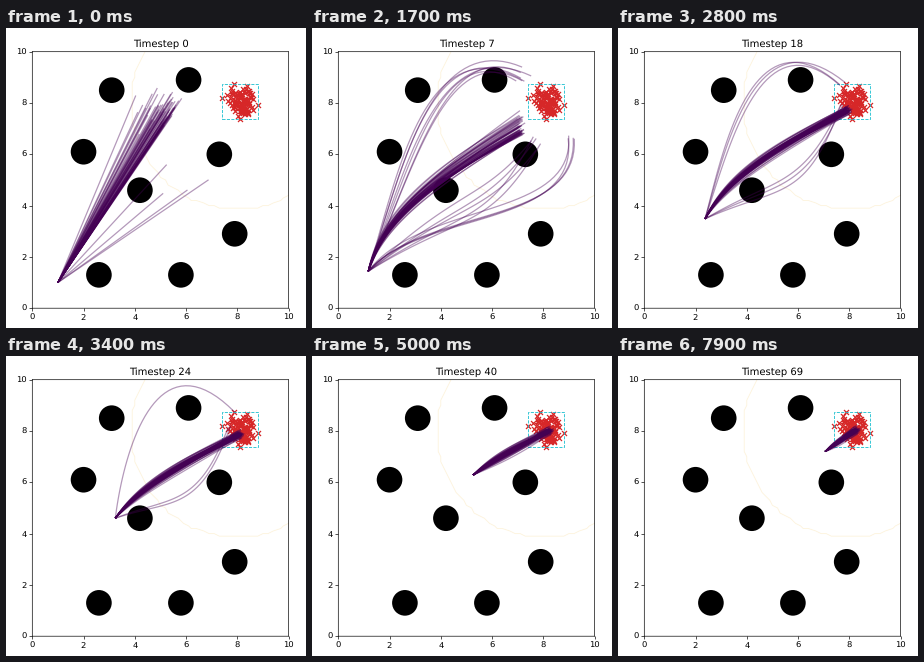
These frames come from a looping animation (300 px wide and 300 px high, 8000 ms). A matplotlib script:

```python
import matplotlib.pyplot as plt
import numpy as np
from matplotlib.animation import FuncAnimation
from matplotlib.collections import LineCollection
from matplotlib.patches import Circle, Rectangle

plt.rcParams["text.hinting"] = "none"

FRAMES, INTERVAL, HOLD = 80, 100, 10
GOAL = 8 + 8j
OBSTACLES = [(3.1, 8.5), (6.1, 8.9), (2.0, 6.1), (7.3, 6.0),
             (4.2, 4.6), (7.9, 2.9), (2.6, 1.3), (5.8, 1.3)]
rng = np.random.default_rng(11)

# Positions are complex numbers x + yj.
STEPS = np.array([0, 7, 13, 24, 40, 51, 69])
ROBOT = np.array([1 + 1j, 1.17 + 1.44j, 1.72 + 2.5j, 3.24 + 4.6j,
                  5.26 + 6.28j, 6.2 + 6.78j, 7.06 + 7.2j])
SPEED = np.gradient(ROBOT, STEPS)

# Detours: two control points, final end, lag of the end at the start.
OVER = (3 + 5.9j, 4.2 + 11.2j, 7.8 + 8.6j, .6 - .3j)
BETWEEN = (5 + 4.6j, 6 + 4j, 7.7 + 8.5j, 0 + 1.9j)
UNDER = (3.5 + 4.2j, 9.8 + 3.4j, 9.6 + 7.2j, .4 + .4j)
DIRECT_END, DIRECT_LAG = 8.3 + 8.05j, 1.1 + 1.25j

S = np.linspace(0, 1, 40)
ARCH = np.sin(np.pi * S)


def robot_at(t):
    """Cubic Hermite passage through the robot's key positions."""
    i = min(np.searchsorted(STEPS, t, side="right") - 1, len(STEPS) - 2)
    h = STEPS[i + 1] - STEPS[i]
    u = (t - STEPS[i]) / h
    return ((1 + 2 * u) * (1 - u) ** 2 * ROBOT[i]
            + u * (1 - u) ** 2 * h * SPEED[i]
            + u * u * (3 - 2 * u) * ROBOT[i + 1]
            + u * u * (u - 1) * h * SPEED[i + 1])


def bezier(a, b, c, d):
    return ((1 - S) ** 3 * a + 3 * S * (1 - S) ** 2 * b
            + 3 * S * S * (1 - S) * c + S ** 3 * d)


class Plan:
    def __init__(self, route, life, angle, fan, length):
        self.route, self.life = route, life
        self.ray = length * np.exp(1j * (angle + fan * rng.exponential()))
        self.end = complex(*rng.normal(size=2))
        self.bow = rng.normal()
        self.lift = rng.exponential()

    def curve(self, t):
        start = robot_at(t)
        settle = min(1, np.exp((7 - t) / 9))
        fresh = np.exp(-t / 7)
        if self.route and t <= self.life:
            b, c, end, lag = self.route
            shift = .35 * (start - ROBOT[2])
            b, c = b + shift, c + shift
            wide = .08 + .35 * fresh
            end += wide * self.end - lag * settle
        else:
            wide = .07
            end = DIRECT_END - DIRECT_LAG * settle
            end += wide * self.end + .5j * fresh * self.lift
            chord = end - start
            bend = 1 / (1 + (t / 24) ** 3)
            b = start + chord * (.25 + .16j * bend)
            c = start + chord * (.6 + .09j * bend)
        chord = end - start
        bow = wide * self.bow * min(1, abs(chord) / 3)
        bent = bezier(start, b, c, end) + 1j * chord / abs(chord) * bow * ARCH
        straight = np.exp(-t / 2)  # the first plans are plain rays
        return straight * (start + self.ray * S) + (1 - straight) * bent


def group(route, count, lives, angle, fan, lengths):
    return [Plan(route, life, angle, fan, rng.uniform(*lengths))
            for life in np.linspace(*lives, count)]


PLANS = (group(None, 52, (99, 99), .97, .05, (7.3, 8.7))
         + group(OVER, 7, (9, 25), 1.03, .06, (6.5, 8.7))
         + group(BETWEEN, 5, (10, 36), .97, .04, (7.5, 8.5))
         + group(UNDER, 4, (10, 17), .58, .08, (3.5, 7.4)))

fig = plt.figure(figsize=(5, 5), dpi=60)
ax = fig.add_axes([26.3 / 300, 19.8 / 300, 256.2 / 300, 256.5 / 300])
ax.set(xlim=(0, 10), ylim=(0, 10), xticks=range(0, 11, 2),
       yticks=range(0, 11, 2))
for spine in ax.spines.values():
    spine.set_snap(False)
title = ax.set_title("Timestep 0")

ring = GOAL + 4.15 * np.exp(1j * np.linspace(0, 2 * np.pi, 120))
ax.plot(ring.real.round(1), ring.imag.round(1), color="#fdf3dc", lw=1, zorder=1)
for spot in OBSTACLES:
    ax.add_patch(Circle(spot, .5, color="black", lw=0, zorder=2))

# Samples of the goal, scaled to fill their bounding box.
low, size = np.array([7.42, 7.38]), np.array([1.38, 1.36])
marks = rng.normal(size=(100, 2))
marks = low + size * (marks - marks.min(axis=0)) / np.ptp(marks, axis=0)
ax.scatter(*marks.T, marker="x", color="tab:red", zorder=3)
ax.add_patch(Rectangle(low, *size, fill=False, ec="tab:cyan", lw=1, ls="--",
                       zorder=4))

bundle = LineCollection([], colors="#440154", linewidths=1.5, alpha=.4,
                        zorder=5)
ax.add_collection(bundle, autolim=False)


def update(frame):
    t = max(0, frame - HOLD)
    title.set_text(f"Timestep {t}")
    curves = [plan.curve(t) for plan in PLANS]
    bundle.set_segments([np.column_stack([z.real, z.imag]) for z in curves])
    return title, bundle


anim = FuncAnimation(fig, update, frames=FRAMES, interval=INTERVAL,
                     repeat=True, repeat_delay=0)
plt.show()
```
